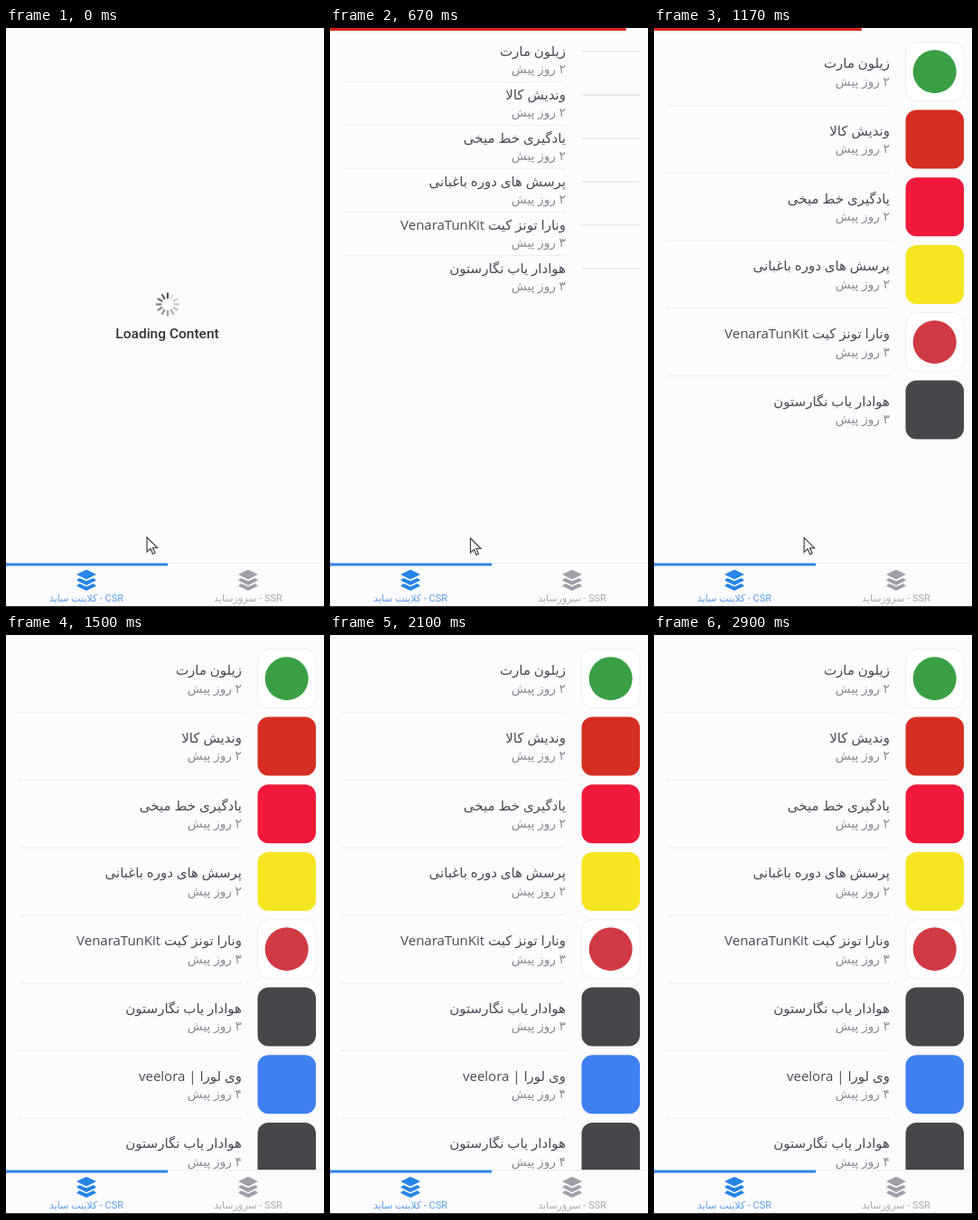
These frames come from a looping animation (352 px wide and 640 px high, 2.93 s). An HTML page:

```html
<!DOCTYPE html>
<html lang="fa">
<head>
<meta charset="utf-8">
<style>
  html, body { margin: 0; width: 100%; height: 100%; overflow: hidden; background: #fcfcfe; }
  svg { display: block; width: 100vw; height: 100vh; }
  text { font-family: 'Open Sans', 'DejaVu Sans', sans-serif; }
  .title { font-size: 15px; fill: #4b4954; direction: rtl; }
  .age { font-size: 13.8px; fill: #8b8994; direction: rtl; }
  .tab { font: 11px Roboto, 'DejaVu Sans', sans-serif; text-anchor: middle; direction: rtl; }
  .wait { font: 500 15.5px Roboto, sans-serif; fill: #333238; text-anchor: middle; }
</style>
</head>
<body>
<svg id="stage" viewBox="0 0 352 640">
  <defs>
    <g id="stack">
      <path d="M0-11.8 11-6.6 0-1-11-6.6Z"/>
      <path id="layer" d="M-11 0-7.8-2.6 0 .7 7.8-2.6 11 0 0 5.4Z"/>
      <use href="#layer" y="6.2"/>
    </g>
  </defs>
  <g id="loading">
    <g id="spinner" transform="translate(179 305.5)" stroke="#55545c" stroke-width="2.2"></g>
    <text class="wait" x="178.5" y="343">Loading Content</text>
  </g>
  <g id="list"></g>
  <rect y="591" width="352" height="49" fill="#fcfcfe"/>
  <rect x="179" y="591" width="173" height="1" fill="#ebeaf0"/>
  <rect y="591.5" width="179" height="3" fill="#2f86ea"/>
  <use href="#stack" x="89" y="610.5" fill="#2584e6"/>
  <use href="#stack" x="268" y="610.5" fill="#a19ea8"/>
  <text class="tab" x="89" y="634" fill="#5b9ce8">CSR - کلاینت ساید</text>
  <text class="tab" x="268" y="634" fill="#aaa8b2">SSR - سرورساید</text>
  <rect y="639" width="352" height="1" fill="#26262a"/>
  <path id="cursor" d="M0 0V16L4 12.5 6.5 18.5 9 17.3 6.4 11.5H11.5Z" fill="#fff" stroke="#45444a" stroke-width="1.2"/>
  <rect id="bar" height="3" fill="#dd2419"/>
</svg>
<script>
const LOOP = 2930, LIST_AT = 640, IMAGES_AT = 980, MORE_AT = 1230;
const SPOKES = 12;
const $ = id => document.getElementById(id);

const fan = 'هوادار یاب نگارستون';
// title, days ago, mark colour, whether the mark is a disc on a white tile
const items = [
  ['زیلون مارت', '۲', '#3a9f45', true],
  ['وندیش کالا', '۲', '#d42f22'],
  ['یادگیری خط میخی', '۲', '#f0193a'],
  ['پرسش های دوره باغبانی', '۲', '#f5e621'],
  ['ونارا تونز کیت VenaraTunKit', '۳', '#d03a42', true],
  [fan, '۳', '#47464b'],
  ['وی لورا | veelora', '۴', '#3f80f2'],
  [fan, '۴', '#47464b'],
];

function add(parent, tag, attrs, text = '') {
  const el = document.createElementNS('http://www.w3.org/2000/svg', tag);
  for (const key in attrs) el.setAttribute(key, attrs[key]);
  el.textContent = text;
  return parent.appendChild(el);
}

const spokes = Array.from({ length: SPOKES }, (_, i) =>
  add($('spinner'), 'path', { d: 'M0-6.5V-13', transform: `rotate(${i * 360 / SPOKES})` }));

const rows = items.map(([title, days, color, disc]) => {
  const root = add($('list'), 'g', {});
  const words = add(root, 'g', {});
  add(words, 'text', { class: 'title', x: 261, y: 44 }, title);
  add(words, 'text', { class: 'age', x: 261, y: 63.5 }, days + ' روز پیش');
  const line = add(root, 'rect', { height: 1, fill: '#edecf2' });
  const flat = add(root, 'rect', { x: 279, y: 25, width: 64, height: 2, fill: '#eae9f0' });
  const tile = add(root, 'g', {});
  add(tile, 'rect', { x: 278.5, y: 15.7, width: 64.5, height: 65, rx: 12,
    fill: disc ? '#fff' : color, stroke: disc ? '#edecf2' : 'none' });
  if (disc) add(tile, 'circle', { cx: 310.7, cy: 48.2, r: 24, fill: color });
  return { root, words, line, flat, tile };
});

const show = (el, on) => el.setAttribute('visibility', on ? 'inherit' : 'hidden');
const move = (el, x, y) => el.setAttribute('transform', `translate(${x} ${y})`);

// Linear interpolation through [time, value] points
function track(t, keys) {
  const i = keys.findIndex(k => k[0] > t);
  if (i < 0) return keys[keys.length - 1][1];
  if (!i) return keys[0][1];
  const [a, from] = keys[i - 1], [b, to] = keys[i];
  return from + (to - from) * (t - a) / (b - a);
}

// Each request grows the bar, fills it, then fades it out
const barWidth = [[440, 0], [470, 11], [560, 28], [680, 352], [860, 352], [860, 0],
  [1010, 0], [1090, 28], [1170, 228], [1240, 352]];
const barOpacity = [[680, 1], [860, 0], [860, 1], [1260, 1], [1450, 0]];
const cursorX = [[0, 156], [470, 155], [900, 156], [1080, 157], [1170, 166], [1400, 205]];
const cursorY = [[0, 563], [470, 564], [900, 564], [1170, 563], [1400, 645]];

function draw(t) {
  show($('loading'), t < LIST_AT);
  show($('list'), t >= LIST_AT);

  const head = Math.floor(t * SPOKES / 1000);
  spokes.forEach((s, i) => {
    const age = ((head - i) % SPOKES + SPOKES) % SPOKES;
    s.setAttribute('opacity', 1 - age * 0.077);
  });

  const loaded = t >= IMAGES_AT;
  const count = t < MORE_AT ? 6 : items.length;
  rows.forEach(({ root, words, line, flat, tile }, i) => {
    show(root, i < count);
    move(root, 0, i * (loaded ? 74.75 : 48));
    move(words, 0, loaded ? 0 : -13.5);
    line.setAttribute('x', loaded ? 13 : 15);
    line.setAttribute('y', loaded ? 85 : 59);
    line.setAttribute('width', loaded ? 248 : 246);
    show(line, i < count - 1);
    show(flat, !loaded);
    show(tile, loaded);
  });

  $('bar').setAttribute('width', track(t, barWidth));
  $('bar').setAttribute('opacity', track(t, barOpacity));
  move($('cursor'), track(t, cursorX), track(t, cursorY));
}

const start = performance.now();
function tick() {
  draw((performance.now() - start) % LOOP);
  requestAnimationFrame(tick);
}
tick();
</script>
</body>
</html>
```
